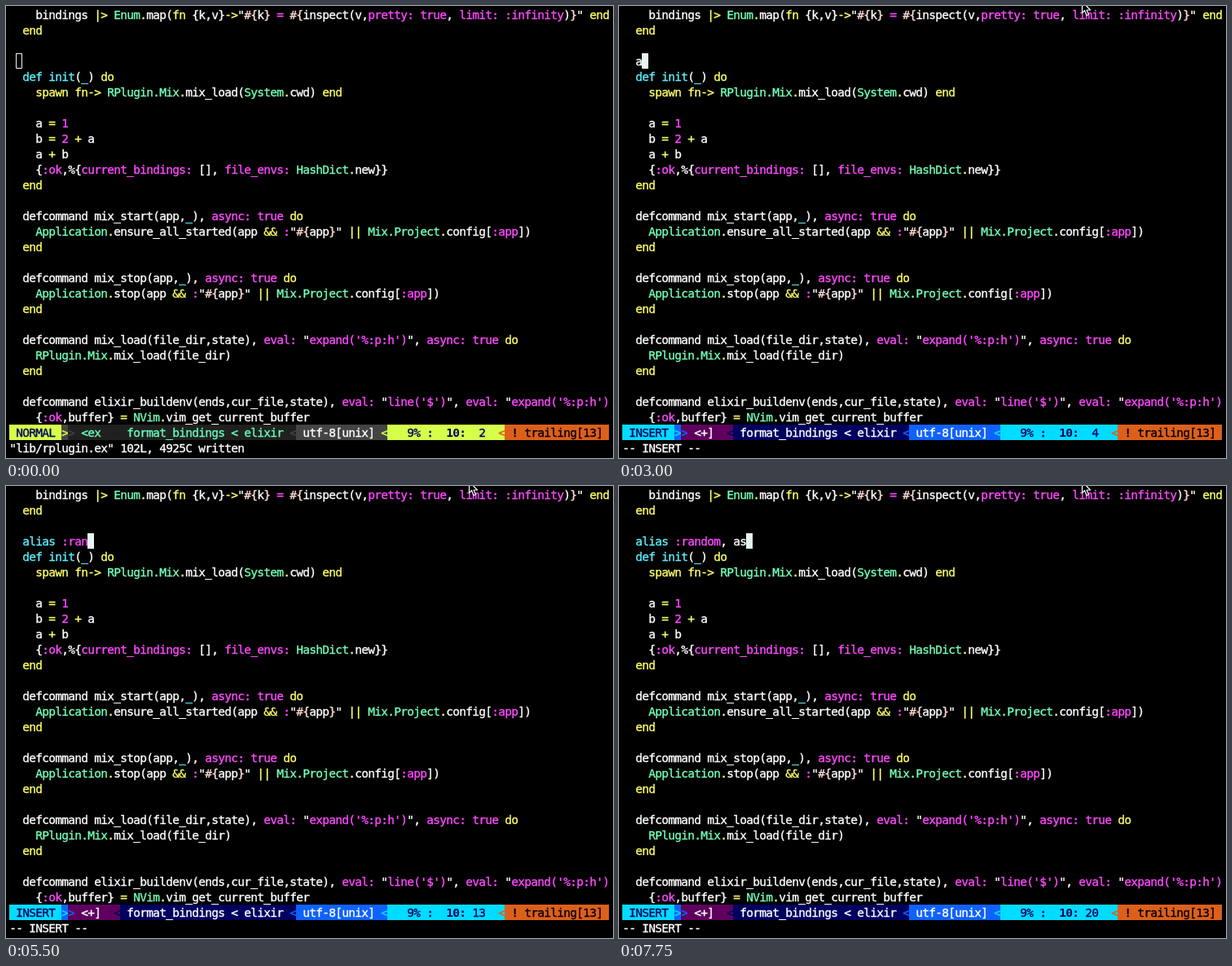
Write an HTML page with a canvas that moves like this. It is 745 by 555 pixels and loops after 8000 ms.

```html
<!DOCTYPE html>
<html lang="en">
<head>
<meta charset="utf-8">
<title>Editor session</title>
<style>
html, body { margin: 0; width: 100%; height: 100%; overflow: hidden; background: #000; }
canvas { display: block; }
</style>
</head>
<body>
<canvas id="stage" width="745" height="555"></canvas>
<script>
const ctx = document.getElementById("stage").getContext("2d");
const LOOP = 8000, CELL = 8, LINE = 19, LEFT = 4, TOP = 1;
const FONT = '14.5px "DejaVu Sans Mono", monospace';
const INK = { w: "#ffffff", y: "#ffff66", c: "#5cf0ff", g: "#74ffb8", m: "#ff48ff", p: "#ffdcd8" };

// "^x" switches to ink x; every row starts white.
const CODE = {
  0: `    bindings ^y|> ^gEnum^y.^wmap(^yfn ^w{k,v}^y->^w"^p#{^wk^p}^m = ^p#{^winspect(v,^mpretty: true^w, ^mlimit: :infinity^w)^p}^w" ^yend`,
  1: `  ^yend`,
  4: `  ^cdef init^w(^c_^w) ^ydo`,
  5: `    ^yspawn fn-> ^gRPlugin.Mix^y.^wmix_load(^gSystem^y.^wcwd) ^yend`,
  7: `    a ^y= ^m1`,
  8: `    b ^y= ^m2 ^y+ ^wa`,
  9: `    a ^y+ ^wb`,
  10: `    {^m:ok^w,%{^mcurrent_bindings: ^w[], ^mfile_envs: ^gHashDict^y.^wnew}}`,
  11: `  ^yend`,
  13: `  defcommand mix_start(app,^c_^w), ^masync: true ^ydo`,
  14: `    ^gApplication^y.^wensure_all_started(app ^y&& ^m:^w"^p#{^wapp^p}^w" ^y|| ^gMix.Project^y.^wconfig[^m:app^w])`,
  15: `  ^yend`,
  17: `  defcommand mix_stop(app,^c_^w), ^masync: true ^ydo`,
  18: `    ^gApplication^y.^wstop(app ^y&& ^m:^w"^p#{^wapp^p}^w" ^y|| ^gMix.Project^y.^wconfig[^m:app^w])`,
  19: `  ^yend`,
  21: `  defcommand mix_load(file_dir,state), ^meval: ^w"^mexpand('%:p:h')^w", ^masync: true ^ydo`,
  22: `    ^gRPlugin.Mix^y.^wmix_load(file_dir)`,
  23: `  ^yend`,
  25: `  defcommand elixir_buildenv(ends,cur_file,state), ^meval: ^w"^mline('$')^w", ^meval: ^w"^mexpand('%:p:h')`,
  26: `    {^m:ok^w,buffer} ^y= ^gNVim^y.^wvim_get_current_buffer`
};

// [start time, text typed on the edited row]
const TYPING = [
  [2000, ""], [3000, "a"], [3250, "ali"], [3500, "alis"], [3750, "alisa"],
  [4000, "alis"], [4250, "alia"], [4500, "^calias"], [4750, "^calias "],
  [5250, "^calias ^w:"], [5500, "^calias ^m:ran"], [5750, "^calias ^m:rando"],
  [6000, "^calias ^m:random"], [6250, "^calias ^m:random^w,"],
  [6500, "^calias ^m:random^w, "], [7750, "^calias ^m:random^w, as"]
];
const POINTER = [[500, 560, 5], [750, 561, -2], [1000, 568, -6]];

const NORMAL = { name: "NORMAL", a: "#d5ff4a", b: "#444444", c: "#202020", text: "#66ffb8", ink: "#00005f" };
const INSERT = { name: "INSERT", a: "#00dcff", b: "#0f62ff", c: "#00005f", text: "#ffffff", ink: "#00005f" };
const EDITED = "#5f005f", WARN = "#dd5f1c";

const at = (steps, t) => steps.filter(s => s[0] <= t).pop();
const plain = s => s.replace(/\^[a-z]/g, "");

function put(col, row, text, ink, back, bold) {
  const x = LEFT + col * CELL, y = TOP + row * LINE;
  if (back) {
    ctx.fillStyle = back;
    ctx.fillRect(x, y, text.length * CELL, LINE);
  }
  ctx.font = (bold ? "bold " : "") + FONT;
  ctx.fillStyle = ctx.strokeStyle = ink;
  ctx.lineWidth = .35;
  [...text].forEach((ch, i) => {
    if (ch === " ") return;
    const cx = x + (i + .5) * CELL + .5;
    ctx.fillText(ch, cx, y + 15);
    // a hairline outline gives the glyphs a slightly fuller weight
    if (!bold) ctx.strokeText(ch, cx, y + 15);
  });
  return col + text.length;
}

function putCode(row, source) {
  let col = 0;
  ("^w" + source).split("^").slice(1).forEach(part => {
    col = put(col, row, part.slice(1), INK[part[0]]);
  });
}

function drawStatus(mode, edited, column) {
  const { a, b, c, text, ink } = mode;
  const file = edited ? EDITED : c;
  const parts = [
    [` ${mode.name} `, ink, a], [">", a, b], [">", b, file],
    [edited ? " <+]  " : " <ex  ", text, file], ["<", c, file],
    [" format_bindings < elixir ", text, c], ["<", b, c],
    [" utf-8[unix] ", "#ffffff", b], ["<", a, b],
    ["   9% :  ", ink, a], ["10:", ink, a, true],
    [String(column).padStart(3) + "  ", ink, a],
    ["<", WARN, a], [" ! trailing[13] ", "#000000", WARN]
  ];
  let col = 0;
  for (const [str, fg, bg, bold] of parts) col = put(col, 27, str, fg, bg, bold);
}

function drawCursor(col, focused) {
  const x = LEFT + col * CELL, y = TOP + 3 * LINE;
  if (focused) {
    ctx.fillStyle = "#e6f4f3";
    ctx.fillRect(x, y, CELL, LINE);
  } else {
    ctx.strokeStyle = "#f0f8f8";
    ctx.lineWidth = 1;
    ctx.strokeRect(x + .5, y + .5, CELL - 1, LINE - 1);
  }
}

function drawPointer(x, y) {
  ctx.save();
  ctx.translate(x + .5, y + .5);
  ctx.beginPath();
  [[0, 0], [0, 14], [3, 11], [5.5, 17], [8, 16], [5.5, 10.5], [10, 10.5]]
    .forEach(p => ctx.lineTo(...p));
  ctx.closePath();
  ctx.fillStyle = "#000";
  ctx.fill();
  ctx.strokeStyle = "#fff";
  ctx.lineWidth = 1.2;
  ctx.stroke();
  ctx.restore();
}

function draw(t) {
  ctx.fillStyle = "#000";
  ctx.fillRect(0, 0, 745, 555);
  ctx.textAlign = "center";
  ctx.lineJoin = "round";
  for (const row in CODE) putCode(+row, CODE[row]);

  const step = at(TYPING, t);
  const typed = step ? step[1] : "";
  const col = step ? 2 + plain(typed).length : 1;
  putCode(3, "  " + typed);
  drawCursor(col, t >= 1000);
  drawStatus(step ? INSERT : NORMAL, typed !== "", col + 1);
  put(0, 28, step ? "-- INSERT --" : '"lib/rplugin.ex" 102L, 4925C written', "#ffffff");

  const spot = at(POINTER, t);
  if (spot) drawPointer(spot[1], spot[2]);
}

const start = performance.now();
function tick() {
  draw((performance.now() - start) % LOOP);
  requestAnimationFrame(tick);
}
tick();
</script>
</body>
</html>
```
